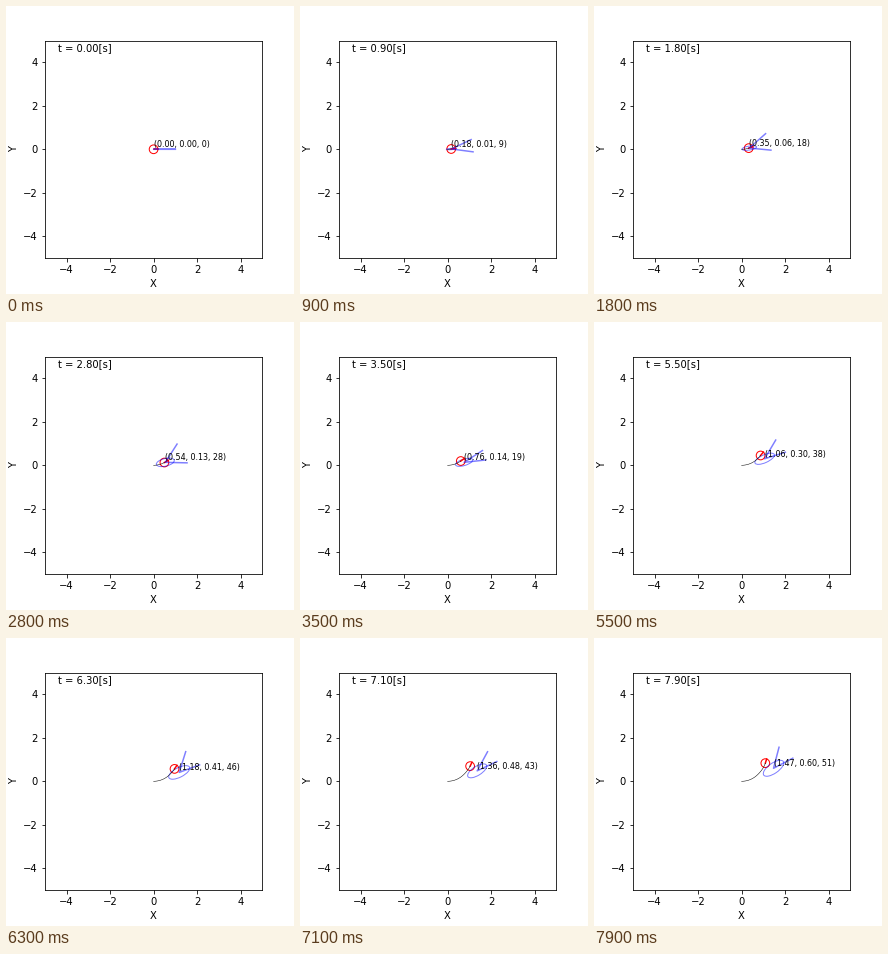
Write a matplotlib script that moves like this. It is 288 px wide and 288 px high and loops after 8000 ms.

```python
import numpy as np
import matplotlib.pyplot as plt
from matplotlib.animation import FuncAnimation
from matplotlib.patches import Circle, Ellipse

DT, STEPS = 0.1, 80
NU, OMEGA = 0.2, np.radians(10)
RADIUS = 0.2

# Per-step variance of forward and turning speed
M = np.diag([0.19**2 * NU + 0.001**2 * OMEGA,
             0.13**2 * NU + 0.2**2 * OMEGA]) / DT

# Sensor corrections: step -> x, y, heading in degrees
FIXES = {33: (0.723, 0.123, 17.5),
         44: (0.8755, 0.180, 27.5),
         64: (1.253, 0.390, 36.5)}
FIX_VARS = {0: 0.25**2, 2: np.radians(3.8)**2}


def move(pose, nu, omega):
    x, y, th = pose
    mid = th + omega * DT / 2
    chord = nu * DT * np.sinc(omega * DT / 2 / np.pi)
    return np.array([x + chord * np.cos(mid), y + chord * np.sin(mid),
                     th + omega * DT])


def spread(cov, th):
    """Grow the covariance by one motion step."""
    mid = th + OMEGA * DT / 2
    c, s = np.cos(mid), np.sin(mid)
    F = np.eye(3)
    F[:2, 2] = -NU * DT * s, NU * DT * c
    A = DT * np.array([[c, -NU * DT * s / 2], [s, NU * DT * c / 2], [0, 1]])
    return F @ cov @ F.T + A @ M @ A.T


def shrink(cov):
    """Reduce the covariance by one sensor correction."""
    for i, var in FIX_VARS.items():
        cov = cov - np.outer(cov[:, i], cov[i]) / (cov[i, i] + var)
    return cov


def true_path():
    poses = [np.zeros(3)]
    for k in range(1, STEPS):
        rate = 6.5 if 40 < k <= 63 else 10.2
        poses.append(move(poses[-1], 0.185, np.radians(rate)))
    return np.array(poses)


def beliefs():
    mean, cov = np.zeros(3), np.eye(3) * 1e-10
    out = [(mean, cov)]
    for k in range(1, STEPS):
        cov = spread(cov, mean[2])
        mean = move(mean, NU, OMEGA)
        if k in FIXES:
            x, y, deg = FIXES[k]
            mean, cov = np.array([x, y, np.radians(deg)]), shrink(cov)
        out.append((mean, cov))
    return out


PATH, BELIEFS = true_path(), beliefs()

fig = plt.figure(figsize=(4, 4), dpi=72, facecolor="white")
fig.subplots_adjust(left=0.125, right=0.9, bottom=0.125, top=0.88)
ax = fig.add_subplot(111)
ax.set_aspect("equal")
ax.set(xlim=(-5, 5), ylim=(-5, 5))
ax.set_xlabel("X", fontsize=10)
ax.set_ylabel("Y", fontsize=10)

clock = ax.text(-4.4, 4.5, "", fontsize=10)
nose, = ax.plot([], [], color="red")
body = ax.add_patch(Circle((0, 0), RADIUS, fill=False, color="red"))
trail, = ax.plot([], [], color="black", linewidth=0.5)
oval = ax.add_patch(Ellipse((0, 0), 0, 0, fill=False, color="blue", alpha=0.5))
arms, = ax.plot([], [], color="blue", alpha=0.5)
label = ax.text(0, 0, "", fontsize=8)


def draw(k):
    clock.set_text(f"t = {k * DT:.2f}[s]")

    x, y, th = PATH[k]
    nose.set_data([x, x + RADIUS * np.cos(th)], [y, y + RADIUS * np.sin(th)])
    body.center = x, y
    trail.set_data(PATH[:k + 1, 0], PATH[:k + 1, 1])

    (x, y, th), cov = BELIEFS[k]
    vals, vecs = np.linalg.eigh(cov[:2, :2])
    oval.set_center((x, y))
    oval.width, oval.height = 6 * np.sqrt(vals)
    oval.angle = np.degrees(np.arctan2(vecs[1, 0], vecs[0, 0]))

    dev = 3 * np.sqrt(cov[2, 2])
    lo, hi = th - dev, th + dev
    arms.set_data([x + np.cos(lo), x, x + np.cos(hi)],
                  [y + np.sin(lo), y, y + np.sin(hi)])
    label.set_position((x, y + 0.1))
    label.set_text(f"({x:.2f}, {y:.2f}, {int(np.degrees(th) + 1e-9)})")
    return clock, nose, body, trail, oval, arms, label


anim = FuncAnimation(fig, draw, frames=STEPS, interval=100, repeat=True,
                     repeat_delay=0, blit=False)
plt.show()
```
